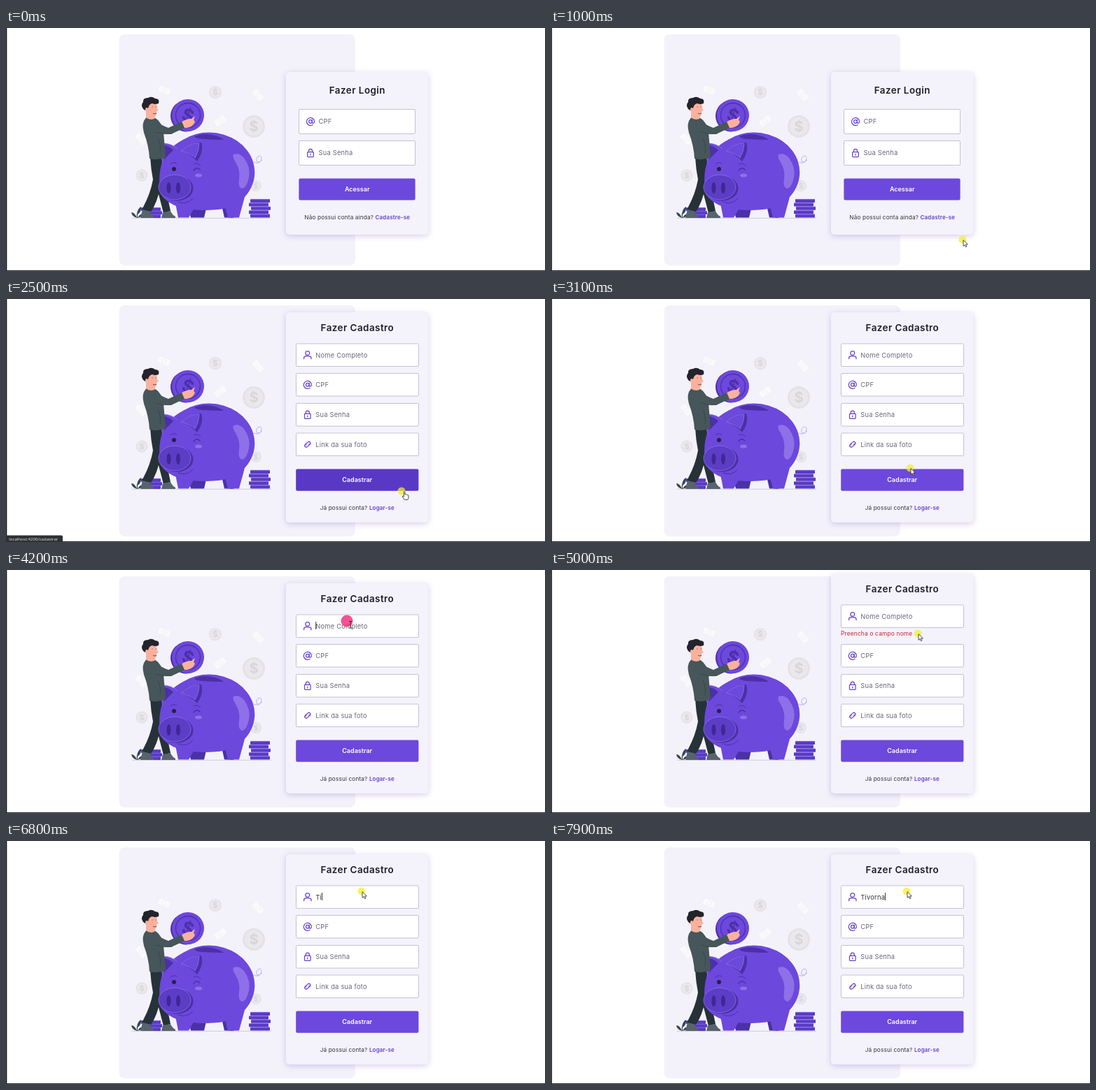
These frames come from a looping animation (770x348 px, 8000 ms). An HTML page:

```html
<!DOCTYPE html>
<html lang="pt-BR">
<head>
<meta charset="utf-8">
<title>Cadastro</title>
<style>
  html, body { margin: 0; width: 100%; height: 100%; overflow: hidden; background: #fff; }
  svg#stage { display: block; width: 100vw; height: 100vh; font-family: Inter, "Open Sans", sans-serif; }
  .card { fill: #f4f2fb; filter: drop-shadow(0 2px 4px rgba(84, 52, 170, .24)); }
  .title { font-size: 13.4px; font-weight: 600; letter-spacing: .035em; fill: #1f1d26; text-anchor: middle; }
  .box { fill: #fff; stroke: #c5c2d6; }
  .label { font-size: 9.3px; letter-spacing: .025em; fill: #6a677b; }
  .typed { fill: #34323d; }
  .button { fill: #6d48dc; }
  .button.hover { fill: #5a38c6; }
  .action { font-size: 9px; font-weight: 600; fill: #fff; text-anchor: middle; }
  .hint { font-size: 8.2px; letter-spacing: .02em; fill: #33313b; text-anchor: middle; }
  .link { font-size: 8px; font-weight: 600; fill: #6442d0; }
  .error { font-size: 8.4px; letter-spacing: .02em; fill: #d0252f; }
  .icon { fill: none; stroke: #6643cf; stroke-width: 1.15; stroke-linecap: round; stroke-linejoin: round; }
  .status { font: 6.1px "Open Sans", "Noto Sans", sans-serif; fill: #ececec; }
  .dollar { font-weight: 700; text-anchor: middle; }
  .pig { fill: #6d48dc; }
  .dark { fill: #4b30a8; }
  .light { fill: #8e70e9; }
  .line { fill: none; stroke: #4b30a8; stroke-linecap: round; }
  .rim { stroke: #9379ea; stroke-width: .7; }
  .skin { fill: #fbb19d; }
  .shirt { fill: #46565a; }
  .pants { fill: #263238; }
  .shoe { fill: #56646b; }
  .note { fill: #fafafc; stroke: #eeedf3; stroke-width: .6; }
</style>
</head>
<body>
<svg id="stage" viewBox="0 0 770 348" preserveAspectRatio="none">
  <defs>
    <g id="user" class="icon"><circle cy="-2.6" r="2.7"/><path d="M-4.8 5V4Q-4.8 1.6 -2.2 1.6H2.2Q4.8 1.6 4.8 4V5"/></g>
    <g id="at" class="icon"><circle r="2.2"/><path d="M2.2 -2.2V1Q2.4 2.5 3.8 2.2Q5.2 1.8 5.1 -.3A5.1 5.1 0 1 0 2.9 4.3"/></g>
    <g id="lock" class="icon"><rect x="-4" y="-1.3" width="8" height="6.4" rx=".7"/><path d="M-2.3 -1.3V-3A2.3 2.3 0 0 1 2.3 -3V-1.3M0 1.2V2.8"/></g>
    <g id="chain" class="icon" transform="rotate(-42)"><path d="M-.6 -2H-2.4A2 2 0 0 0 -2.4 2H.6A2 2 0 0 0 2 .8M.6 2H2.4A2 2 0 0 0 2.4 -2H-.6A2 2 0 0 0 -2 -.8"/></g>
    <g id="coin"><circle r="16" fill="#e4e2e7"/><circle r="13" fill="#eae8ed"/><text class="dollar" y="7" font-size="20" fill="#d8d6db">$</text></g>
    <g id="bill" class="note"><rect x="-9" y="-5" width="18" height="10"/><circle r="3"/></g>
    <g id="disc"><rect x="-14" width="28" height="5" rx=".8" fill="#5a3bc4"/><path d="M-13.5 .3H13.5" stroke="#9379ea" stroke-width=".7"/></g>
    <g id="plant" fill="#37474f"><path d="M0 0Q-1 -5 1 -10Q3 -15 6 -16Q7 -9 1 -5L1 0ZM0 0Q-3 -8 -8 -8Q-7 -2 0 0ZM1 0Q4 -6 8 -5Q7 -1 1 0Z"/></g>
  </defs>

  <rect x="161.5" y="9" width="337.5" height="331" rx="8" fill="#f3f2fa"/>

  <g id="art">
    <use href="#bill" transform="translate(226 89) rotate(24)"/>
    <use href="#bill" transform="translate(360 96) rotate(48)"/>
    <use href="#bill" transform="translate(306 133) rotate(-35)"/>
    <use href="#bill" transform="translate(193 159) rotate(50)"/>
    <use href="#coin" transform="translate(354 141)"/>
    <use href="#coin" transform="translate(299 92) scale(.57)"/>
    <use href="#coin" transform="translate(194 211) scale(.54)"/>
    <use href="#coin" transform="translate(357 226) scale(.5)"/>
    <path d="M180 272.3H379" stroke="#c7c3d8" stroke-width=".8"/>
    <use href="#plant" transform="translate(187 272)"/>
    <use href="#plant" transform="translate(322 272) scale(.9)"/>
    <use href="#disc" x="207" y="257"/><use href="#disc" x="209" y="262"/><use href="#disc" x="207" y="267"/>
    <g id="stack">
      <use href="#disc" x="363" y="245"/><use href="#disc" x="361" y="250.4"/><use href="#disc" x="364" y="255.8"/>
      <use href="#disc" x="361" y="261.2"/><use href="#disc" x="363" y="266.6"/>
    </g>

    <path class="pants" d="M206 185L228 183L225 214L235 262L225 265L218 238Q214 253 207 263L194 260Q206 239 210 217Q207 202 206 185Z"/>
    <path class="shoe" d="M195 260L206 263Q207 268 211 270V272H192ZM224 264L235 262Q237 267 242 270V272H222Z"/>

    <path fill="none" stroke="#baabf0" stroke-width=".9" d="M354 192Q363 196 365 187Q365 181 360 184Q356 188 359 192Q362 193 366 189"/>
    <path class="dark" d="M258 247L264 271.5H283L288 250ZM308 254L312 271.5H322L330 244Z"/>
    <path class="pig" d="M242 251L246 271.5H261L270 256ZM313 256L317 271.5H333L341 242Z"/>
    <path class="pig" d="M224 189Q232 171 253 160Q270 149.5 290 149.5A66 57 0 0 1 322 256Q300 263 266 260Q234 257 221 238Q216 211 224 189Z"/>
    <path class="light" d="M325 181Q333 178 340 186Q350 200 347 214Q344 228 338 230Q331 229 333 216Q335 204 328 192Q323 185 325 181Z"/>
    <path class="dark" d="M269 155Q280 150 294 153Q305 155 311 160Q295 160 281 159Q270 158 269 155Z"/>
    <path class="pig rim" d="M224 194Q219 174 224 165Q236 165 245 173"/>
    <path class="dark" d="M226 188Q222 175 226 168Q233 169 239 175Z"/>
    <path class="dark" d="M250 176Q264 163 279 164Q283 177 273 191Q264 181 250 176Z"/>
    <path class="pig rim" d="M250 176Q264 164 276 165Q276 176 270 186Q264 180 250 176Z"/>
    <circle cx="240" cy="202" r="3" fill="#29204a"/>
    <path class="line" stroke-width="1.5" d="M268 204Q272 198 277 203"/>
    <path class="line" stroke-width="1" d="M235 195Q239 191 244 194M268 195Q273 192 278 197"/>
    <ellipse class="light" cx="275" cy="211" rx="5" ry="2.6"/>
    <ellipse class="dark" cx="244" cy="229.5" rx="23.5" ry="18"/>
    <ellipse class="rim" cx="241" cy="228" rx="23" ry="17.8" fill="#5c3dc6"/>
    <ellipse cx="232.5" cy="229" rx="3" ry="8" fill="#3f2795"/>
    <ellipse cx="246" cy="229" rx="3" ry="8" fill="#3f2795"/>
    <path class="line" stroke-width="1" d="M246 249Q258 254 267 244"/>

    <circle class="dark" cx="257.5" cy="126" r="22.5"/>
    <circle class="pig" cx="260" cy="125" r="23"/>
    <circle class="line" cx="260" cy="125" r="17.5" stroke-width="1.3"/>
    <text class="dollar dark" x="260" y="134" font-size="25" transform="rotate(18 260 125)">$</text>

    <path class="skin" d="M200 118L213 122L213 131Q204 134 200 129Z"/>
    <path class="skin" d="M198 108Q207 102 215 107L216 115L218 118L215 119.5Q216 127 210 127Q202 127 199 118Z"/>
    <path fill="#22232b" d="M196 116Q192 110 196 106Q195 100 203 100Q208 97 213 101Q220 101 218 108Q213 110 209 108Q204 109 203 115Q199 112 199 118Z"/>
    <path d="M208.5 113H209.5M213.5 113H214.5M210 122.5Q213 123.5 215 122" stroke="#593b3d" fill="none" stroke-width=".9"/>
    <path class="shirt" d="M200 128.5Q207 133 213.5 129Q222 134 225 149L228 185Q217 190 205 187Q204 168 197 150Q193 136 200 128.5Z"/>
    <path class="skin" d="M249 136Q257 129 265 130L270 126L268 132Q272 134 267 139Q260 145 251 142Z"/>
    <path class="shirt" d="M214 133Q223 140 232 143L251 134L255 143L237 151.5Q226 153 213 149Z"/>
    <path d="M214 149Q225 153 237 151.5M217 158Q222 169 220 179" fill="none" stroke="#33464c" stroke-width=".8"/>
  </g>

  <g id="login"></g>
  <g id="signup"></g>

  <path d="M.65 0V348" stroke="#111" stroke-width="1.3"/>
  <path d="M0 347.5H770" stroke="#222"/>
  <g id="status">
    <path d="M0 338.5H79Q81 338.5 81 340.5V348H0Z" fill="#303134"/>
    <text class="status" x="4.3" y="346.2">localhost:4200/cadastrar</text>
  </g>

  <g id="cursor">
    <circle id="halo"/>
    <path id="arrow" d="M1 .6V9.4L3.1 7.5 4.5 10.6 6 9.9 4.6 6.9H7.4Z" fill="#fff" stroke="#222" stroke-width=".8"/>
    <path id="beam" d="M3 .5H4.6L5.2 1 5.8 .5H7.4M5.2 1V9.5M3 10H4.6L5.2 9.5 5.8 10H7.4" fill="none" stroke="#222" stroke-width=".9"/>
    <path id="hand" d="M3.4 1.2Q4.2 .2 5 1.2V5Q6.2 4.3 6.7 5.2Q7.8 4.7 8.3 5.6Q9.8 5.3 10 6.8V9.6L9 12.4H4.4L1.2 8Q1.3 6.7 2.4 7.2L3.4 8.2Z" fill="#fff" stroke="#222" stroke-width=".8"/>
  </g>
</svg>

<script>
const $ = id => document.getElementById(id);
const LOOP = 8000, STEP = 100;
const NAME = "Tivorna";

const field = (x, y, w, h, icon, label, textX, id = "") => `
  <rect class="box" x="${x}" y="${y}" width="${w}" height="${h}" rx="1.5"/>
  <use href="#${icon}" transform="translate(${textX - 11.5} ${y + h / 2}) scale(1.08)"/>
  <text class="label" id="${id}" x="${textX}" y="${y + h / 2 + 3.4}">${label}</text>`;

const button = (x, y, w, h, label, id) => `
  <rect class="button" id="${id}" x="${x}" y="${y}" width="${w}" height="${h}" rx="2"/>
  <text class="action" x="501.7" y="${y + h / 2 + 3.2}">${label}</text>`;

const hint = (y, text, link) =>
  `<text class="hint" x="501.8" y="${y}">${text} <tspan class="link">${link}</tspan></text>`;

$("login").innerHTML = `
  <rect class="card" x="400" y="63" width="203.5" height="233" rx="5"/>
  <text class="title" x="501.9" y="94.2">Fazer Login</text>
  ${field(418.5, 116.5, 166, 35, "at", "CPF", 446.5, "loginCpf")}
  ${field(418.5, 161.5, 166, 35, "lock", "Sua Senha", 446.5, "loginPass")}
  ${button(418.4, 215.4, 166.2, 31.2, "Acessar", "enter")}
  ${hint(274.3, "Não possui conta ainda?", "Cadastre-se")}`;

$("signup").innerHTML = `
  <rect class="card" id="card" x="400" width="203.5" rx="5"/>
  <g id="top">
    <text class="title" x="501.9" y="45.7">Fazer Cadastro</text>
    ${field(414.5, 64, 175, 32.5, "user", "", 442.3, "name")}
    <rect id="caret" y="74" width=".9" height="11" fill="#222"/>
  </g>
  <text class="error" id="error" x="414" y="93.8">Preencha o campo nome</text>
  ${field(414.5, 106.5, 175, 32.5, "at", "CPF", 442.3, "cpf")}
  ${field(414.5, 149.5, 175, 32.5, "lock", "Sua Senha", 442.3, "pass")}
  ${field(414.5, 192, 175, 32.5, "chain", "Link da sua foto", 442.3, "photo")}
  ${button(414.2, 243.6, 175.2, 31.2, "Cadastrar", "send")}
  ${hint(302.3, "Já possui conta?", "Logar-se")}`;

// time, x, y of the pointer
const path = [
  [700, 626, 341], [1000, 588, 303], [1300, 566, 277], [1400, 566, 277], [1500, 565, 275],
  [2500, 565, 275], [2800, 548, 262], [3100, 513, 242], [3500, 489, 110], [3700, 485, 62],
  [4000, 487, 73], [4200, 487, 73], [4500, 612, 91], [4700, 612, 91], [5000, 524, 91],
  [5300, 504, 66], [6300, 504, 66], [6500, 508, 72], [8000, 508, 72]
];
const presses = [[2000, 2300], [4000, 4300], [4500, 4800], [5400, 5700]];
const carets = [[4000, 4500], [5400, 6000], [6400, 8000]];
const keys = [6400, 6800, 7000, 7200, 7400, 7600, 7700];

const within = (t, spans) => spans.some(([a, b]) => t >= a && t < b);
const show = (id, on) => $(id).style.display = on ? "" : "none";

function pointerAt(t) {
  const i = Math.max(1, path.findIndex(p => p[0] > t));
  const [t0, x0, y0] = path[i - 1], [t1, x1, y1] = path[i];
  const k = Math.max(0, (t - t0) / (t1 - t0));
  return [x0 + (x1 - x0) * k, y0 + (y1 - y0) * k];
}

function pointerKind(x, y, signup, shift) {
  if (!signup) return y > 266 && y < 279 && x > 527 && x < 577 ? "hand" : "arrow";
  if (y >= 243.5 && y <= 275) return "hand";
  const tops = [64 - shift, 106, 149, 192];
  const inField = x > 442 && x < 589 && tops.some(top => y >= top + 9 && y <= top + 24);
  return inField ? "beam" : "arrow";
}

function draw(t) {
  const signup = t >= 2300;
  const failed = t >= 4500 && t < 6400;
  const shift = failed ? 14 : 0;
  show("login", !signup);
  show("signup", signup);
  show("status", t >= 1700 && t < 2800);

  const top = failed ? 6 : 19;
  $("card").setAttribute("y", top);
  $("card").setAttribute("height", 320 - top);
  $("top").setAttribute("transform", `translate(0 ${-shift})`);
  show("error", failed);

  const text = NAME.slice(0, keys.filter(k => t >= k).length);
  $("name").textContent = text || "Nome Completo";
  $("name").classList.toggle("typed", !!text);
  $("caret").setAttribute("x", 442.3 + (text ? $("name").getComputedTextLength() : 0));
  show("caret", within(t, carets));

  const [x, y] = pointerAt(t);
  const kind = pointerKind(x, y, signup, shift);
  show("cursor", t >= 700);
  $("cursor").setAttribute("transform", `translate(${x} ${y})`);
  for (const id of ["arrow", "beam", "hand"]) show(id, id === kind);
  $("send").classList.toggle("hover", signup && kind === "hand");

  const pressed = within(t, presses);
  $("halo").setAttribute("r", pressed ? 8.5 : 5.5);
  $("halo").setAttribute("fill", pressed ? "#f5327f" : "#f3ee2c");
  $("halo").setAttribute("opacity", pressed ? .85 : .72);
}

const start = performance.now();
function frame() {
  const t = (performance.now() - start) % LOOP;
  draw(Math.floor(t / STEP) * STEP);
  requestAnimationFrame(frame);
}
frame();
</script>
</body>
</html>
```
